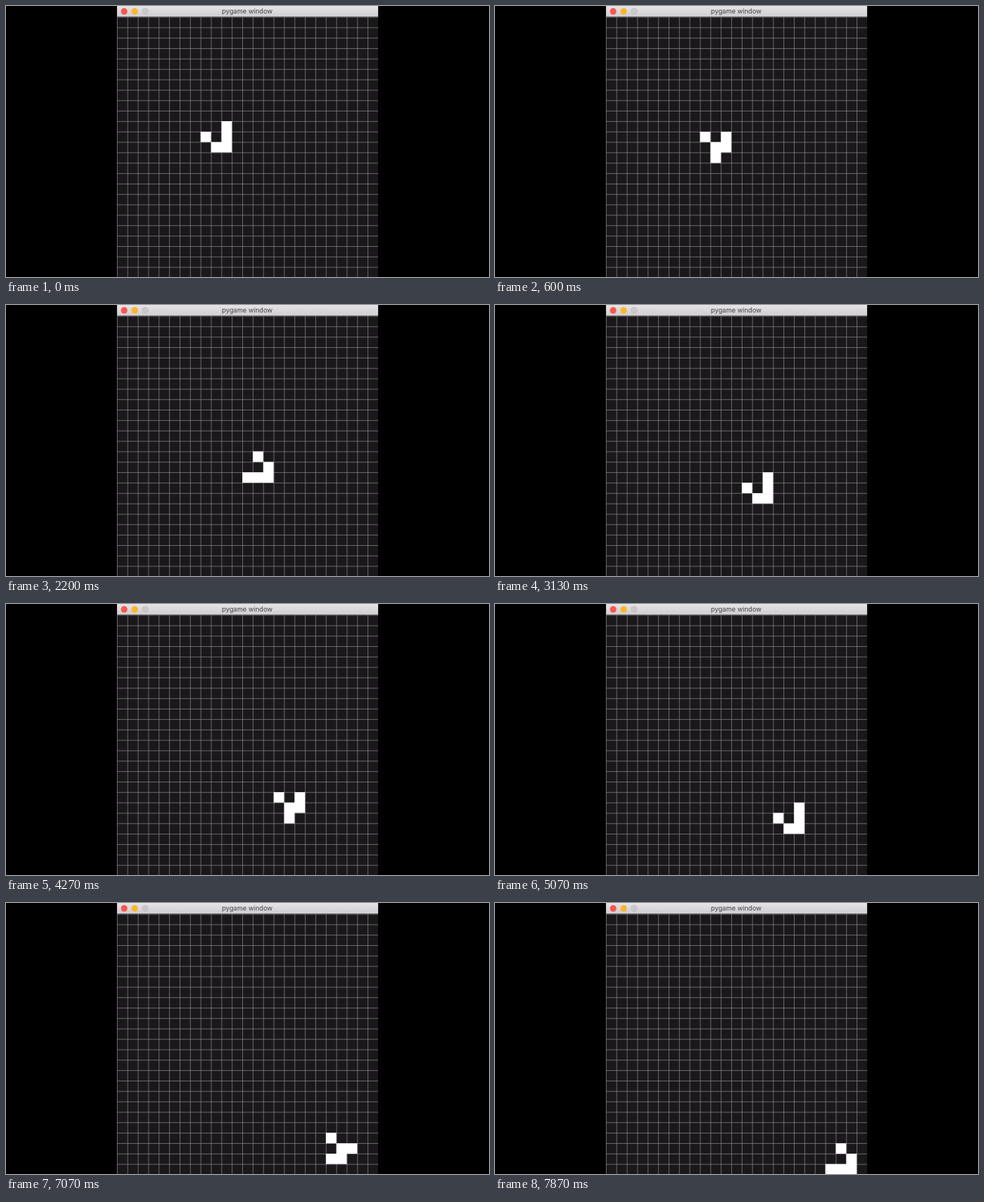
These frames come from a looping animation (640 by 360 pixels, 8000 ms). An HTML page:

```html
<!DOCTYPE html>
<html lang="en">
<head>
<meta charset="utf-8">
<title>Glider</title>
<style>
  html, body { margin: 0; width: 100%; height: 100%; overflow: hidden; background: #000; }
  svg { display: block; width: 640px; height: 360px; }
  text { font: 8.7px Inter, Roboto, sans-serif; fill: #434143; text-anchor: middle; }
</style>
</head>
<body>
<svg viewBox="0 0 640 360">
  <defs>
    <linearGradient id="bar" x2="0" y2="1">
      <stop stop-color="#e6e4e6"/>
      <stop offset="1" stop-color="#cfcdcf"/>
    </linearGradient>
  </defs>
  <rect x="147.1" width="346" height="360" fill="#1a181a"/>
  <g transform="translate(147.1 14.65) scale(13.84)">
    <path id="grid" stroke="#8a898a" stroke-width=".05"/>
    <path id="glider" fill="#fff"/>
  </g>
  <rect x="147.1" width="346" height="14.2" fill="url(#bar)"/>
  <circle cx="156.6" cy="7.1" r="4.3" fill="#fc5650"/>
  <circle cx="170.5" cy="7.1" r="4.3" fill="#fbb62b"/>
  <circle cx="184.4" cy="7.1" r="4.1" fill="#cac8ca" stroke="#bab8ba" stroke-width=".5"/>
  <text x="319.6" y="10.2">pygame window</text>
</svg>
<script>
const LOOP = 8000, CELLS = 25;
const START = { x: 8, y: 10 };
// The four phases of a glider, row by row; it moves one cell diagonally per cycle.
const PHASES = [
  ["..#", "#.#", ".##"],
  [".#.", "..##", ".##"],
  ["..#", "...#", ".###"],
  ["", ".#.#", "..##", "..#"]
];

const byId = id => document.getElementById(id);

let lines = "";
for (let i = 0; i < CELLS; i++) {
  const p = i + 0.025;
  lines += `M${p} 0V${CELLS}M0 ${p}H${CELLS}`;
}
byId("grid").setAttribute("d", lines);

// Generations advance at 14 per 33 ticks of a 15 Hz clock, rounded to 10 ms.
const startOf = gen => Math.round(Math.floor((33 * gen + 8) / 14) * 100 / 15) * 10;

function gliderPath(gen) {
  const shift = Math.floor(gen / 4);
  let d = "";
  PHASES[gen % 4].forEach((row, y) => [...row].forEach((cell, x) => {
    if (cell === "#") d += `M${START.x + shift + x} ${START.y + shift + y}h1v1h-1z`;
  }));
  return d;
}

function draw() {
  const t = performance.now() % LOOP;
  let gen = 0;
  while (gen < 50 && startOf(gen + 1) <= t) gen++;
  byId("glider").setAttribute("d", gliderPath(gen));
  requestAnimationFrame(draw);
}
draw();
</script>
</body>
</html>
```
